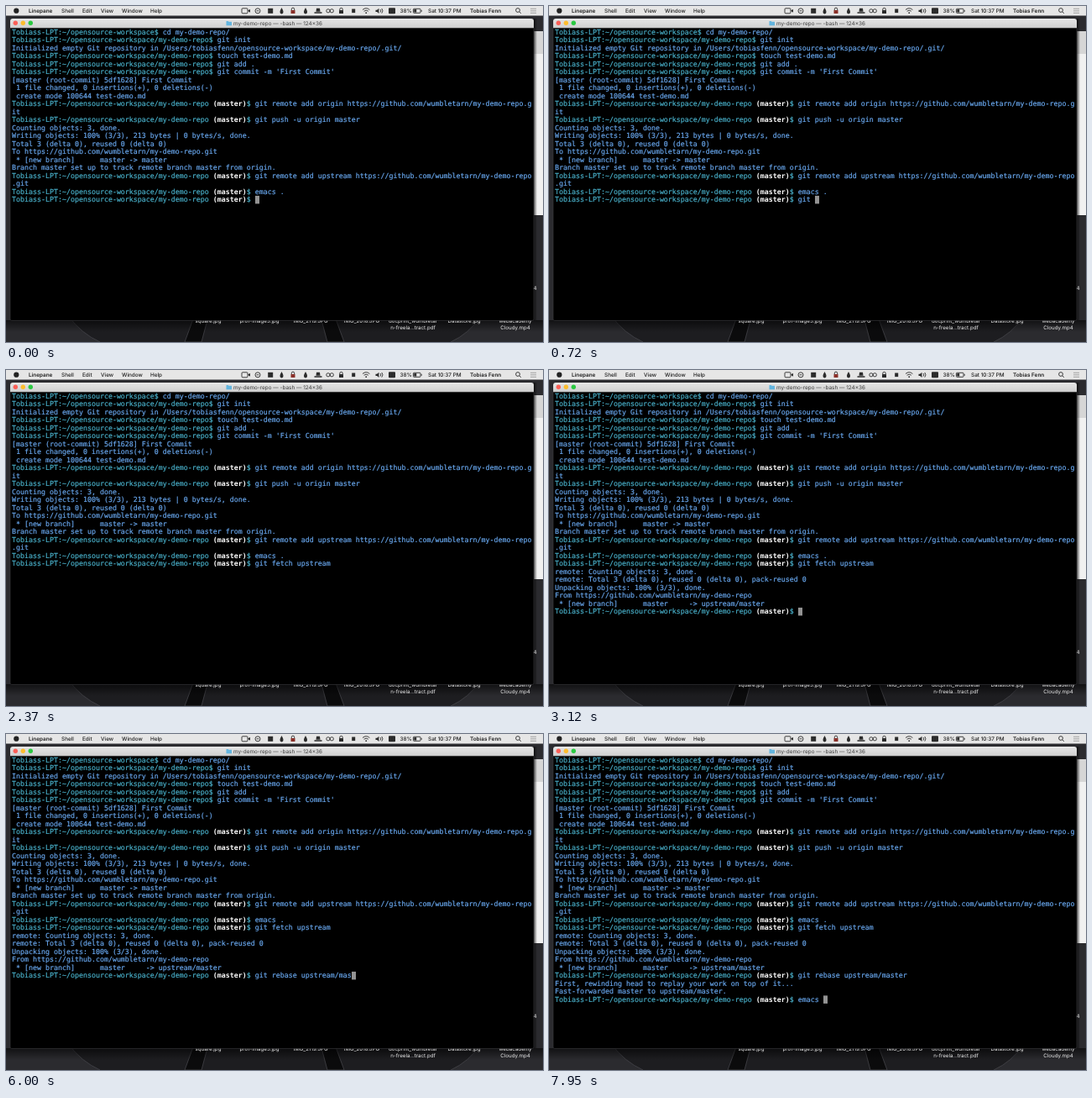
An HTML page for the animation above (8 s loop, 640 by 400 pixels).

```html
<!DOCTYPE html>
<html lang="en">
<head>
<meta charset="utf-8">
<title>Shell session</title>
<style>
html, body { margin: 0; width: 100%; height: 100%; overflow: hidden; background: #1c1c1f; }
svg { display: block; width: 640px; height: 400px; }
text { white-space: pre; text-rendering: geometricPrecision; }
.ui { font: 500 6.4px Inter, "Open Sans", sans-serif; fill: #1c1c1c; }
.strong { font-weight: 600; }
.title { font-weight: 400; fill: #3c3c3c; }
.label { font: 6.2px Inter, "Open Sans", sans-serif; fill: #ececec; text-anchor: middle; }
.row { font: 8.306px "DejaVu Sans Mono", monospace; fill: #6aaaf2; stroke: #6aaaf2; stroke-width: .18px; }
.path { fill: #4ab3cd; stroke: #4ab3cd; }
.branch { fill: #fff; stroke: none; font-weight: bold; }
</style>
</head>
<body>
<svg id="stage" viewBox="0 0 640 400" xmlns="http://www.w3.org/2000/svg">
  <defs>
    <linearGradient id="bar" x2="0" y2="1"><stop stop-color="#e6e6e6"/><stop offset="1" stop-color="#cfcfcf"/></linearGradient>
    <linearGradient id="shade" x2="0" y2="1"><stop stop-opacity=".6"/><stop offset="1" stop-opacity="0"/></linearGradient>
    <linearGradient id="edge"><stop stop-opacity=".65"/><stop offset="1" stop-opacity="0"/></linearGradient>
  </defs>

  <!-- desktop -->
  <rect width="640" height="400" fill="#2b2b2f"/>
  <path d="M75 370Q90 390 112 400H530Q552 390 565 370Z" fill="#1d1d20"/>
  <path d="M75 370Q90 390 112 400M565 370Q552 390 530 400" fill="none" stroke="#45454a" stroke-width=".8"/>
  <path d="M224 370L213 400H233L241 370ZM392 370L403 400H383L375 370Z" fill="#0b0b0c" stroke="#45454a" stroke-width=".8"/>
  <rect y="374" width="640" height="14" fill="url(#shade)"/>
  <rect x="629" y="30" width="11" height="219" fill="#f1f1f1"/>
  <rect x="629" y="30" width="11" height="27" fill="#d6d6d6"/>
  <rect x="629" y="15" width="4" height="359" fill="url(#edge)"/>
  <g id="labels"></g>

  <!-- menu bar -->
  <rect width="640" height="11.5" fill="#e6e6e6"/>
  <circle cx="12.3" cy="5.7" r="3.1" fill="#222"/>
  <g id="menu"></g>
  <g fill="none" stroke="#2b2b2b" stroke-width=".9">
    <rect x="281" y="2.8" width="7" height="6" rx="1"/>
    <circle cx="300" cy="5.8" r="3"/><path d="M298.5 5.8h3"/>
    <path d="M340.3 5.2V3.8a1.7 1.7 0 0 1 3.4 0v1.4M397.8 5.2V4a1.7 1.7 0 0 1 3.4 0v1.2"/>
    <circle cx="383.9" cy="5.8" r="2.1"/><circle cx="388.3" cy="5.8" r="2.1"/>
    <path d="M425 4.5q4.2-3.6 8.4 0M426.6 6.2q2.6-2.1 5.2 0"/>
    <path d="M446 4q1.5 1.8 0 3.6M447.8 3q2.4 2.8 0 5.6"/>
    <rect x="485.4" y="3.3" width="8.6" height="5" rx=".8"/><path d="M495.2 4.8v2"/>
    <circle cx="610" cy="5" r="2.4"/><path d="M611.8 6.8l2 2"/>
    <path d="M625 3.3h7M625 5.8h7M625 8.3h7" stroke="#9a9a9a"/>
  </g>
  <g fill="#2b2b2b">
    <path d="M288 5.8l3-2v4zM328.5 2q4.2 6.8 0 7.4q-4.2-.6 0-7.4zM357 2q4.2 6.8 0 7.4q-4.2-.6 0-7.4z"/>
    <rect x="312.2" y="2.8" width="6" height="6"/>
    <rect x="339.5" y="5" width="5" height="4" rx=".5" fill="#8a3029"/>
    <path d="M367.5 7.2h9v1.5h-9zM369.5 6.7l.5-4h4l.5 4z"/>
    <rect x="397" y="5" width="5" height="4" rx=".5"/>
    <rect x="412.2" y="3.5" width="4" height="4.6"/>
    <circle cx="429.2" cy="8.2" r=".9"/>
    <path d="M440.5 4.7h1.7l2.2-2v6.2l-2.2-2h-1.7z"/>
    <rect x="456" y="2.3" width="8" height="7" rx="1"/>
    <rect x="486.2" y="4.1" width="3" height="3.4"/>
  </g>

  <!-- window -->
  <path d="M5 373V18q0-3 3-3H626q3 0 3 3V373q0 1.5-2 1.5H7q-2 0-2-1.5z" fill="#000"/>
  <path d="M5 26V18q0-3 3-3H626q3 0 3 3V26z" fill="url(#bar)"/>
  <path d="M5 26H629" stroke="#aaa" stroke-width=".6"/>
  <circle cx="11.3" cy="20.3" r="2.7" fill="#fb5f57"/>
  <circle cx="20.3" cy="20.3" r="2.7" fill="#fdbd2e"/>
  <circle cx="29.3" cy="20.3" r="2.7" fill="#2ac941"/>
  <path d="M262.5 18h2.3l.7.8h3.5v4.5h-6.5z" fill="#63b5df"/>
  <g id="title"></g>
  <path d="M5 26V373q0 1.5 2 1.5H627q2 0 2-1.5V26" fill="none" stroke="#3c3c3f" stroke-width=".6"/>
  <rect id="cursor" width="5" height="9.5" fill="#939393"/>
  <g id="rows"></g>
</svg>
<script>
const NS = "http://www.w3.org/2000/svg";
const $ = id => document.getElementById(id);
const LOOP = 8000, CELL = 5, LINE = 9.5, LEFT = 7, TOP = 26.4;

function addText(parent, x, y, cls, str, tag = "text") {
  const el = document.createElementNS(NS, tag);
  if (tag === "text") { el.setAttribute("x", x); el.setAttribute("y", y); }
  el.setAttribute("class", cls);
  el.textContent = str;
  return parent.appendChild(el);
}

[[27, "Linepane", "strong"], [66, "Shell"], [91, "Edit"], [113, "View"], [138, "Window"], [172, "Help"],
 [469.5, "38%"], [503, "Sat 10:37 PM"], [553, "Tobias Fenn", "strong"]]
  .forEach(([x, s, cls = ""]) => addText($("menu"), x, 8.1, "ui " + cls, s));
addText($("title"), 271, 22.7, "ui title", "my-demo-repo — -bash — 124×36");

[[241, 376.5, "square.jpg"], [302, 376.5, "prof-image3.jpg"], [363, 376.5, "IMG_2119.JPG"],
 [424, 376.5, "IMG_2018.JPG"], [485, 376.5, "docprint_wumbletar"], [485, 385.2, "n-freela...tract.pdf"],
 [546, 376.5, "Datastore.jpg"], [607, 376.5, "webacademy"], [607, 385.2, "Cloudy.mp4"],
 [630.5, 338, "4"]].forEach(([x, y, s]) => addText($("labels"), x, y, "label", s));

const HOME = "Tobiass-LPT:~/opensource-workspace";
const REPO = HOME + "/my-demo-repo";
const URL_BASE = "https://github.com/wumbletarn/my-demo-repo";
const out = text => ({ path: "", branch: "", text });
const home = text => ({ path: HOME + "$ ", branch: "", text });
const repo = text => ({ path: REPO + "$ ", branch: "", text });
const master = text => ({ path: REPO + " ", branch: "(master)", text });

const history = [
  home("cd my-demo-repo/"),
  repo("git init"),
  out("Initialized empty Git repository in /Users/tobiasfenn/opensource-workspace/my-demo-repo/.git/"),
  repo("touch test-demo.md"),
  repo("git add ."),
  repo("git commit -m 'First Commit'"),
  out("[master (root-commit) 5df1628] First Commit"),
  out(" 1 file changed, 0 insertions(+), 0 deletions(-)"),
  out(" create mode 100644 test-demo.md"),
  master("git remote add origin " + URL_BASE + ".g"),
  out("it"),
  master("git push -u origin master"),
  out("Counting objects: 3, done."),
  out("Writing objects: 100% (3/3), 213 bytes | 0 bytes/s, done."),
  out("Total 3 (delta 0), reused 0 (delta 0)"),
  out("To " + URL_BASE + ".git"),
  out(" * [new branch]      master -> master"),
  out("Branch master set up to track remote branch master from origin."),
  master("git remote add upstream " + URL_BASE),
  out(".git"),
  master("emacs .")
];

// Rows that appear, and the runs typed into them: [start, step, text]
const live = [
  { at: 0, line: master(""), keys: [[420, 90, "git "], [840, 90, "fetch "], [1380, 80, "upstream"]] },
  { at: 2640, line: out(""), keys: [[2700, 0, "remote: Counting objects: 3, done."]] },
  { at: 2700, line: out("remote: Total 3 (delta 0), reused 0 (delta 0), pack-reused 0") },
  { at: 2730, line: out("Unpacking objects: 100% (3/3), done.") },
  { at: 2760, line: out("From " + URL_BASE) },
  { at: 2970, line: out(" * [new branch]      master     -> upstream/master") },
  { at: 2970, line: master(""), keys: [[3720, 90, "git "], [4110, 75, "rebase"], [4980, 60, " upst"], [5340, 80, "ream/mas"], [6030, 120, "ter"]] },
  { at: 6450, line: out(""), keys: [[6570, 0, "First, rewinding head to replay your work on top of it..."]] },
  { at: 6840, line: out("Fast-forwarded master to upstream/master.") },
  { at: 6930, line: master(""), keys: [[7650, 54, "emacs "]] }
];
const blinkOff = [[2250, 2640], [3510, 3720], [7500, 7650]];

function addRow(index, line) {
  const el = addText($("rows"), LEFT, TOP + LINE * index + 7.3, "row", "");
  if (line.path) addText(el, 0, 0, "path", line.path, "tspan");
  if (line.branch) {
    addText(el, 0, 0, "branch", line.branch, "tspan");
    addText(el, 0, 0, "path", "$ ", "tspan");
  }
  return { el, body: addText(el, 0, 0, "", line.text, "tspan") };
}

history.forEach((line, i) => addRow(i, line));
live.forEach((r, i) => Object.assign(r, addRow(history.length + i, r.line)));

const typed = (keys, t) => keys.map(([start, step, s]) =>
  t < start ? "" : step ? s.slice(0, Math.floor((t - start) / step) + 1) : s).join("");

function render(t) {
  let row = 0, col = 0;
  live.forEach((r, i) => {
    const shown = t >= r.at;
    r.el.style.display = shown ? "" : "none";
    if (!shown) return;
    const text = r.keys ? typed(r.keys, t) : r.line.text;
    if (r.body.textContent !== text) r.body.textContent = text;
    const prompt = r.line.path.length + (r.line.branch ? r.line.branch.length + 2 : 0);
    const done = !r.line.path && text;
    row = history.length + i + (done ? 1 : 0);
    col = done ? 0 : prompt + text.length;
  });
  const cursor = $("cursor");
  cursor.setAttribute("x", LEFT + col * CELL);
  cursor.setAttribute("y", TOP + row * LINE);
  cursor.style.display = blinkOff.some(([a, b]) => t >= a && t < b) ? "none" : "";
}

const begin = performance.now();
function tick() {
  render((performance.now() - begin) % LOOP);
  requestAnimationFrame(tick);
}
render(0);
requestAnimationFrame(tick);
</script>
</body>
</html>
```
